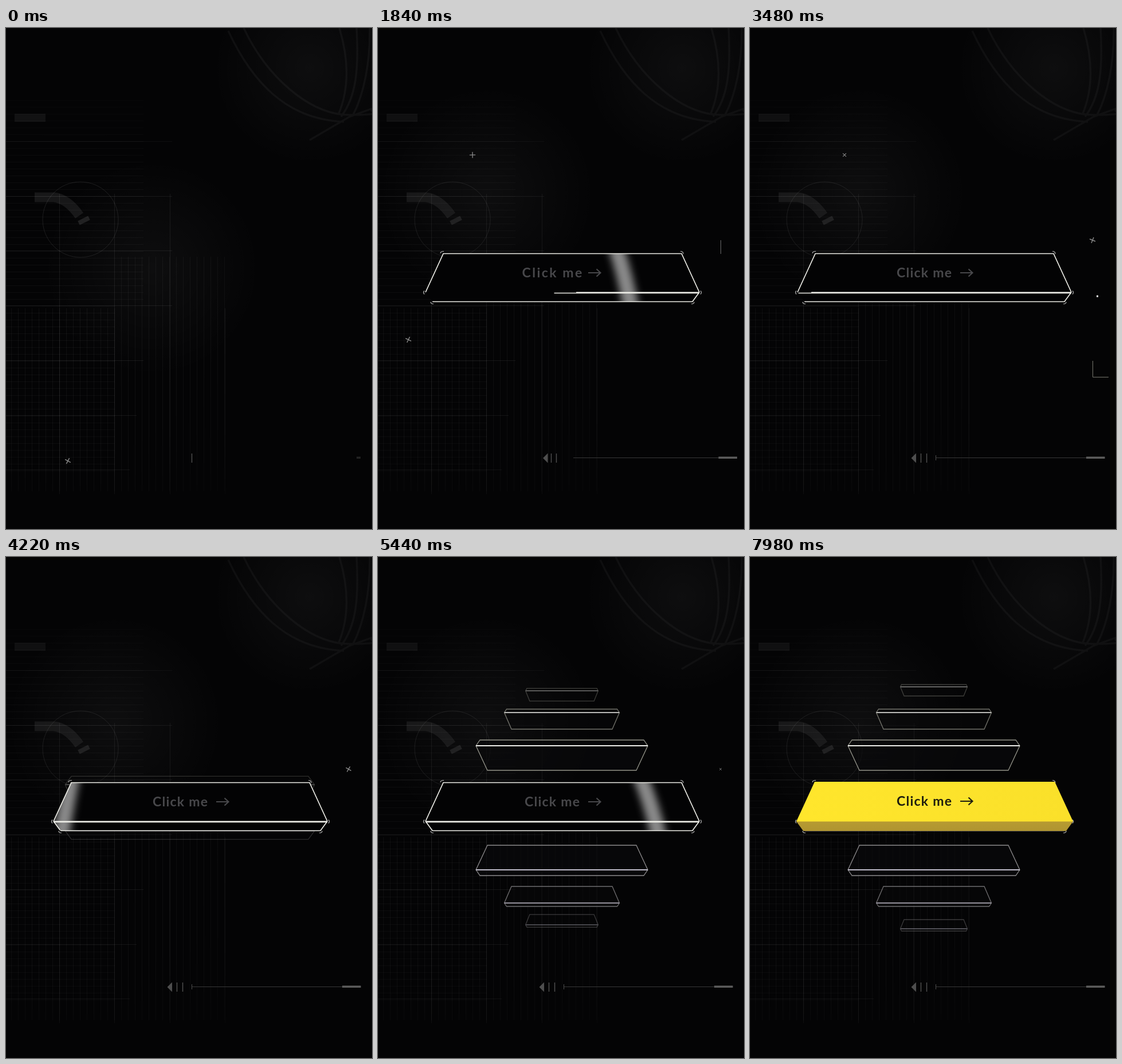
An HTML page for the animation above (8000 ms loop, 639 by 876 pixels).

```html
<!DOCTYPE html>
<html lang="en">
<head>
<meta charset="utf-8">
<title>Click me</title>
<style>
  html, body { margin: 0; width: 100%; height: 100%; overflow: hidden; background: #040405; }
  svg { display: block; width: 100vw; height: 100vh; }
  text { font: 700 23px Lato, "Open Sans", sans-serif; }
</style>
</head>
<body>
<svg id="stage" viewBox="0 0 639 876" fill="none">
  <defs>
    <radialGradient id="fade" gradientUnits="userSpaceOnUse" cx="120" cy="500" r="430">
      <stop offset="0" stop-color="#fff"/>
      <stop offset=".6" stop-color="#ccc"/>
      <stop offset="1" stop-color="#333"/>
    </radialGradient>
    <mask id="gridMask" maskUnits="userSpaceOnUse" x="0" y="0" width="639" height="876">
      <rect width="639" height="876" fill="url(#fade)"/>
    </mask>
    <radialGradient id="haze">
      <stop offset="0" stop-color="#fff" stop-opacity=".04"/>
      <stop offset="1" stop-color="#fff" stop-opacity="0"/>
    </radialGradient>
    <linearGradient id="front" x1="0" y1="0" x2="0" y2="1">
      <stop offset="0" stop-color="#cfb23c"/>
      <stop offset="1" stop-color="#b09530"/>
    </linearGradient>
    <linearGradient id="face" x1="0" y1="0" x2="1" y2="0">
      <stop offset="0" stop-color="#ffe62c"/>
      <stop offset="1" stop-color="#fae02a"/>
    </linearGradient>
    <clipPath id="buttonClip"><path d="M114 394H530L561 462 549 479H95L83 462Z"/></clipPath>
    <filter id="soft" x="-100%" y="-30%" width="300%" height="160%"><feGaussianBlur stdDeviation="7 3"/></filter>
  </defs>
</svg>
<script>
const LOOP = 8000, CX = 321, CY = 438.5;
const stage = document.getElementById('stage');

function el(tag, attrs, parent = stage) {
  const node = document.createElementNS('http://www.w3.org/2000/svg', tag);
  set(node, attrs);
  parent.appendChild(node);
  return node;
}
function set(node, attrs) {
  for (const k in attrs) node.setAttribute(k, attrs[k]);
}
const clamp = v => Math.max(0, Math.min(1, v));
const span = (t, a, b) => clamp((t - a) / (b - a));
const smooth = u => u * u * (3 - 2 * u);
const easeOut = (u, n) => 1 - Math.pow(1 - u, n);
const mix = (a, b, u) => a + (b - a) * u;
const pulse = (t, a, b) => smooth(span(t, a, a + 220)) * (1 - smooth(span(t, b - 220, b)));
const color = (a, b, u) => `rgb(${a.map((v, i) => Math.round(mix(v, b[i], u)))})`;

// Value at time t along [time, value] keys, easing out on each leg
function track(t, ...keys) {
  let v = keys[0][1];
  for (let i = 1; i < keys.length; i++) {
    v = mix(v, keys[i][1], easeOut(span(t, keys[i - 1][0], keys[i][0]), 2));
  }
  return v;
}

// Backdrop
const haze = el('circle', { r: 190, fill: 'url(#haze)' });
el('circle', { cx: 530, cy: 70, r: 170, fill: 'url(#haze)' });
const back = el('g', { stroke: '#fff' });
const grid = el('g', { mask: 'url(#gridMask)' }, back);
let rows = '', columns = '', major = '';
for (let y = 126; y < 780; y += 12) rows += `M0 ${y + .5}H${y < 480 ? 240 : 190}`;
for (let x = 9; x < 384; x += 12) columns += `M${x + .5} ${x < 190 ? 490 : 400}V810`;
for (let i = 0; i < 7; i++) major += `M0 ${198.5 + Math.round(i * 95.7)}H${i < 4 ? 290 : 288 - i * 12}`;
for (let i = 0; i < 4; i++) major += `M${93.5 + Math.round(i * 96.3)} ${i < 3 ? 290 : 490}V815`;
el('path', { d: rows, 'stroke-opacity': .045 }, grid);
el('path', { d: columns, 'stroke-opacity': .05 }, grid);
el('path', { d: major, 'stroke-opacity': .085 }, grid);
el('path', {
  d: 'M415 0C455 85 530 152 600 152S630 146 639 142M388 5C430 95 490 160 590 164' +
     'M582 0C600 60 598 110 580 152M612 0C616 70 612 120 585 155M635 0C636 60 625 115 606 152M530 196L600 155 639 141',
  'stroke-width': 3.5, 'stroke-opacity': .042
}, back);
el('rect', { x: 15, y: 150, width: 54, height: 14, fill: '#fff', 'fill-opacity': .06, stroke: 'none' }, back);
el('circle', { cx: 130, cy: 335, r: 66, 'stroke-opacity': .1 }, back);
el('path', { d: 'M50 296H84Q108 299 128 328', 'stroke-width': 17, 'stroke-opacity': .08 }, back);
el('path', { d: 'M127 341L145 332', 'stroke-width': 8, 'stroke-opacity': .11 }, back);

// Stacked outlines: half widths, then distances from the centre, for back, ridge and face edges
const home = [227, 239, 208, 40, 24, -44];
const layers = [
  { pose: [143, 150, 130, 118.5, 108.5, 65.5], start: 4152, light: 1 },
  { pose: [96.5, 100.5, 88, 172.5, 166.5, 137.5], start: 4470, light: .78 },
  { pose: [56.5, 58.5, 52, 215.5, 211.5, 195.5], start: 4977, light: .4 }
];
const stack = el('g', {});
for (let i = layers.length - 1; i >= 0; i--) {
  layers[i].sides = [-1, 1].map(dir => {
    const g = el('g', {}, stack);
    return {
      dir, g,
      body: el('path', { fill: '#0a0a0b', 'fill-opacity': .65, stroke: dir < 0 ? '#929288' : '#8c8a8c', 'stroke-width': 1.3 }, g),
      ridge: el('path', { stroke: dir < 0 ? '#eeeeea' : '#bfbcca', 'stroke-width': 1.8 }, g)
    };
  });
}

// Main button
const plate = el('path', { d: 'M114 394H530L561 462 549 478H95L83 462Z', fill: '#030304' });
const label = el('text', {});
label.textContent = 'Click me';
const arrow = el('path', { d: 'M367 428H388.5M381.5 421.5L388.5 428 381.5 434.5', 'stroke-width': 2.2 });
const glareBox = el('g', { 'clip-path': 'url(#buttonClip)' });
const glare = el('path', { fill: '#b0b0b0', 'fill-opacity': .78, filter: 'url(#soft)' }, glareBox);
const stroke = (d, width) => el('path', { d, stroke: '#eeeee8', 'stroke-width': width, pathLength: 1 });
const outline = stroke('M83 462L114 394.5H530L561 462', 1.7);
const base = stroke('M95 478.5H549L561 462', 1.7);
const ridgeThin = stroke('M561 463.5H83', 1.4);
const ridgeThick = stroke('M561 462.5H83', 2.2);
const corner = stroke('M83 462L95 478.5', 1.7);
el('path', {
  d: 'M109 394Q109 390.5 115 390.5M528 390.5Q533 390.5 533 395M81 459.5Q78 462.5 81 465.5' +
     'M563 459.5Q566 462.5 563 465.5M92 479Q92 482.5 97 482.5M547 482.5Q552 482.5 552 479',
  stroke: '#b5b5b5', 'stroke-width': 1.2, id: 'brackets'
});
const brackets = document.getElementById('brackets');
const gold = el('g', {});
el('path', { d: 'M113 393H532L564 462.5 552 479H93L81 462.5Z', fill: 'url(#front)' }, gold);
el('path', { d: 'M113 393H532L564 462.5H81Z', fill: 'url(#face)' }, gold);
const printed = el('g', {}, gold);
const goldLabel = label.cloneNode(true), goldArrow = arrow.cloneNode(true);
printed.append(goldLabel, goldArrow);

// Crosses: place, lifetime, angle range, final size
const crosses = [
  [108, 757, -600, 520, 12, 42, 1],
  [165, 222, 1250, 3950, -17, 57, .7],
  [53, 545, 1400, 2500, 0, 65, 1],
  [598, 371, 3150, 5560, 18, 45, .9]
].map(([x, y, from, to, a0, a1, shrink]) => ({
  x, y, from, to, a0, a1, shrink,
  node: el('path', { d: 'M-5.5 0H5.5M0 -5.5V5.5', stroke: '#8c8c8c', 'stroke-width': 1.4 })
}));
const post = el('path', { stroke: '#6a6a6a' });
const elbow = el('path', { d: 'M598.5 582V610.5H626', stroke: '#77776e' });
const dot = el('rect', { x: 605, y: 467.5, width: 3, height: 3, fill: '#f4f4f4' });

// Slider
const tri = el('path', { fill: '#4e4e4e' });
const bars = el('path', { stroke: '#505050', 'stroke-width': 1.4 });
const rail = el('path', { stroke: '#383838' });
const knob = el('path', { stroke: '#5c5c5c', 'stroke-width': 3.5 });
const notch = el('path', { d: 'M324.5 747V756', stroke: '#505050' });

const reveal = (node, p) => set(node, { 'stroke-dasharray': `${p} 2`, opacity: p > 0 ? 1 : 0 });

function drawStack(t) {
  let prev = home;
  for (const layer of layers) {
    const p = easeOut(span(t, layer.start, layer.start + 1000), 3);
    const narrow = p + .3 * p * (1 - p); // perspective: width leads the travel
    const pose = layer.pose.map((v, i) => mix(prev[i], v, i < 3 ? narrow : p));
    const [wb, wr, wf, ob, or, of] = pose;
    for (const side of layer.sides) {
      const y = o => CY + side.dir * o;
      set(side.g, { opacity: clamp(p * 1.5) * layer.light });
      set(side.body, {
        d: `M${CX - wr} ${y(or)}L${CX - wb} ${y(ob)}H${CX + wb}L${CX + wr} ${y(or)}L${CX + wf} ${y(of)}H${CX - wf}Z`
      });
      set(side.ridge, { d: `M${CX - wr} ${y(or)}H${CX + wr}` });
    }
    prev = pose;
  }
}

function drawButton(t) {
  const rise = smooth(span(t, 350, 1150));
  reveal(outline, rise);
  reveal(base, rise);
  reveal(ridgeThin, easeOut(span(t, 1023, 3623), 2));
  reveal(ridgeThick, easeOut(span(t, 1023, 4190), 2));
  reveal(corner, span(t, 3750, 4250));
  set(plate, { opacity: smooth(span(t, 500, 1300)) });
  set(brackets, { opacity: smooth(span(t, 700, 1300)) });

  const sweep = t < 3500 ? t - 728 : t - 4177;
  const low = 83 + sweep * .3214;
  const high = low - 3 - (low - 265) * .12;
  const bend = mix(high, low, .55);
  set(glare, {
    d: `M${high - 14} 388H${high + 14}Q${bend + 15} 430 ${low + 14} 484H${low - 14}Q${bend - 13} 430 ${high - 14} 388Z`
  });

  const lit = easeOut(span(t, 5800, 7030), 3);
  const ink = color([72, 72, 75], [30, 28, 14], clamp(lit * 1.1));
  const shown = smooth(span(t, 900, 1600));
  const tight = smooth(span(t, 1750, 2700));
  const lift = clamp(lit * 1.1);
  set(gold, { opacity: lit });
  for (const node of [label, goldLabel]) {
    set(node, { x: mix(251.5, 256, tight), y: 436 - lift, fill: ink, opacity: shown, 'letter-spacing': mix(2.5, 1.25, tight) });
  }
  for (const node of [arrow, goldArrow]) {
    set(node, { stroke: ink, opacity: shown, transform: `translate(0 ${-lift})` });
  }
}

function drawMarks(t) {
  for (const c of crosses) {
    const u = span(t, c.from, c.to);
    const size = pulse(t, c.from, c.to) * mix(1, c.shrink, u);
    set(c.node, {
      transform: `translate(${c.x} ${c.y}) rotate(${mix(c.a0, c.a1, u)}) scale(${size})`,
      opacity: size > 0 ? 1 : 0
    });
  }
  const h = pulse(t, 1550, 2350);
  set(post, { d: `M598.5 ${395 - 24 * h}V395`, opacity: h });
  set(elbow, { opacity: pulse(t, 3150, 3950) });
  set(dot, { opacity: pulse(t, 3200, 3800) });
}

function drawSlider(t) {
  const tip = track(t, [0, 324], [1840, 288], [3000, 281.5]);
  const b1 = track(t, [0, 324.5], [1840, 302.5], [3000, 298.5]);
  const b2 = track(t, [0, 324.5], [1840, 311.5], [3000, 308.5]);
  const end = track(t, [0, 619], [1840, 627], [3000, 619.5]);
  set(tri, { d: `M${tip} 752L${tip + 8.5} 743.5V760.5Z`, opacity: span(t, 150, 700) });
  set(bars, { d: `M${b1} 744V760M${b2} 744V760` });
  set(rail, { d: `M${track(t, [0, 615], [1840, 341], [3000, 325])} 751.5H${end}`, opacity: span(t, 0, 400) });
  set(knob, {
    d: `M${track(t, [0, 612], [1840, 594.5], [3000, 587])} 751.25H${end}`,
    opacity: mix(.35, 1, span(t, 0, 600))
  });
  set(notch, { opacity: span(t, 2300, 2800) });
}

function render(t) {
  const settle = span(t, 0, 800);
  set(haze, { cx: mix(255, 190, settle), cy: mix(420, 290, settle) });
  set(back, { opacity: mix(1, .88, settle) });
  drawStack(t);
  drawButton(t);
  drawMarks(t);
  drawSlider(t);
}

const began = performance.now();
function frame() {
  render((performance.now() - began) % LOOP);
  requestAnimationFrame(frame);
}
render(0);
requestAnimationFrame(frame);
</script>
</body>
</html>
```
